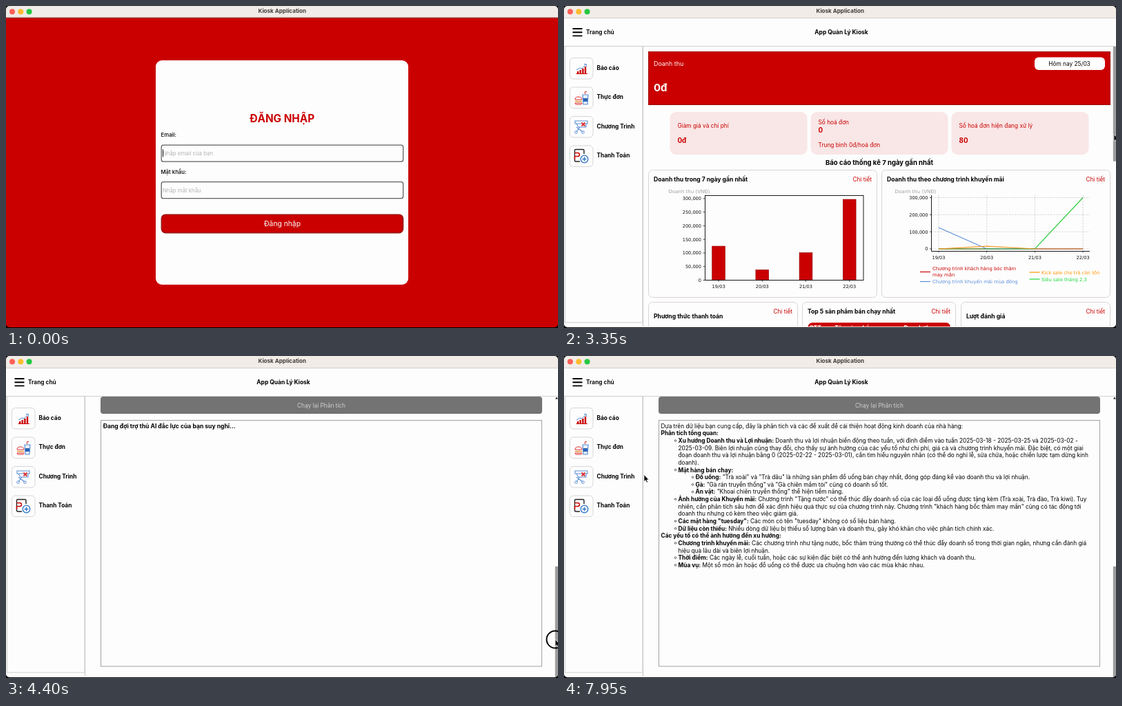
Animation of 800 by 468 pixels, one loop 8 s. Source, as an HTML page:

```html
<!DOCTYPE html>
<html lang="vi">
<head>
<meta charset="utf-8">
<style>
html, body { margin: 0; width: 100%; height: 100%; overflow: hidden; background: #000; }
svg { display: block; }
text { font: 8.3px Inter, sans-serif; white-space: pre; }
.b { font-weight: 700; }
.w { font-weight: 500; }
.d { font-family: "DejaVu Sans", sans-serif; }
.m { text-anchor: middle; }
.e { text-anchor: end; }
</style>
</head>
<body>
<svg id="stage" width="800" height="468" viewBox="0 0 800 468"></svg>
<script>
const RED = '#ca0000', DARK = '#9c0000', MID = '#d9252b', PINK = '#fca4a4', PALE = '#fde0e0';
const BLUE = '#5b8fd6', PAPER = '#fdfdfd', EDGE = '#d9d4d4';
const HEAD = 8.6;

const text = (x, y, s, cls = '', fill = '#000', size = 8.3) =>
  `<text x="${x}" y="${y}" class="${cls}" fill="${fill}" style="font-size:${size}px">${s}</text>`;
const rect = (x, y, w, h, fill, r = 0, stroke = 'none', sw = 1) =>
  `<rect x="${x}" y="${y}" width="${w}" height="${h}" rx="${r}" fill="${fill}" stroke="${stroke}" stroke-width="${sw}"/>`;
const path = (d, stroke, sw = 1, fill = 'none', more = '') =>
  `<path d="${d}" stroke="${stroke}" stroke-width="${sw}" fill="${fill}" ${more}/>`;
const circle = (x, y, r, fill, stroke = 'none', sw = 1) =>
  `<circle cx="${x}" cy="${y}" r="${r}" fill="${fill}" stroke="${stroke}" stroke-width="${sw}"/>`;
const group = (id, body, more = '') => `<g id="${id}" ${more}>${body}</g>`;
const each = (list, fn) => list.map(fn).join('');

// Angles in degrees, clockwise from the right
function wedge(cx, cy, r, from, to, fill) {
  const point = a => `${cx + r * Math.cos(a * Math.PI / 180)} ${cy + r * Math.sin(a * Math.PI / 180)}`;
  return path(`M${cx} ${cy}L${point(from)}A${r} ${r} 0 ${+(to - from > 180)} 1 ${point(to)}Z`, 'none', 0, fill);
}

function titleBar() {
  return rect(0, 0, 800, 17, '#f1ece8') +
    each(['#fe5f57', '#febc2e', '#28c840'], (c, i) => circle(9 + 12.3 * i, 8.2, 4, c)) +
    text(400.3, 10, 'Kiosk Application', 'b m', '#403d3b', 8.1);
}

function login() {
  return rect(0, 17, 800, 451, RED) + rect(0, 16.5, 800, 1.5, '#a03a36') +
    rect(217, 79, 366, 326, PAPER, 9) +
    text(400, 169, 'ĐĂNG NHẬP', 'b m', RED, 15.3) +
    text(224.5, 190, 'Email:', 'w', '#000', 7.8) +
    text(224.5, 244, 'Mật khẩu:', 'w', '#000', 7.8) +
    each([202.2, 255.7], y => rect(225.2, y, 350.4, 24, PAPER, 3, '#606060', 1.3)) +
    rect(225.2, 303, 350.4, 26.8, RED, 6, '#8a1010', 1.2) +
    text(400.5, 320.3, 'Đăng nhập', 'm', '#fff', 10.3) +
    group('email', text(227, 217, '', '', '#000', 7.8)) +
    group('pass', text(227, 270.8, '', '', '#000', 7.8)) +
    group('caret', rect(0, 0, .9, 11, '#000'));
}

function icons() {
  const chart = path('M17.5 98.5H34', RED) +
    each([3, 5, 7, 10], (h, i) => rect(19 + 3.6 * i, 98 - h, 2.4, h, RED)) +
    path('M18 93L23 90L26 91L32 84.5M29 84.5H32.3V88', BLUE);
  const meal = path('M16 136Q16 132 21 132T26 136Z M16 141H26Q26 143 24 143H18Q16 143 16 141Z', '#d33') +
    path('M16 138.5H26', '#e3983a', 1.5) +
    path('M27 129H35L34 143H28Z', BLUE, 1.2, '#e8f0fb') + rect(28, 134, 6, 5, '#2b66b5') +
    path('M30.5 128V124.5H33', '#d33');
  const promo = path('M16 167H34V171H16ZM18 171L21 176H32V171M23 176L18 183M18 176L27 183', BLUE, 1.1) +
    path('M25.5 169.5L30.5 174.5M30.5 169.5L25.5 174.5', '#d33', 1.8) +
    circle(17.5, 183.5, 1.8, 'none', BLUE) + circle(27.5, 183.5, 1.8, 'none', BLUE);
  const pay = path('M29 215V210Q29 208.5 27.5 208.5H17Q15.5 208.5 15.5 210V224Q15.5 226 17 226H23', '#222', 1.4) +
    path('M15.5 213.5H20Q22.5 213.5 22.5 216T20 218.5H15.5V223', RED, 1.4) +
    circle(29.5, 222.5, 5.3, '#fff', '#2b72c4', 1.3) + path('M26.5 222.5H32.5M29.5 219.5V225.5', '#2b72c4', 1.3);
  return chart + meal + promo + pay;
}

function shell() {
  return rect(0, 17, 800, 450, PAPER) +
    path('M0 17.5H800M0 58.5H800', '#d2d0d0') +
    path('M12.5 33H26.5M12.5 38.2H26.5M12.5 43.4H26.5', '#000', 1.9) +
    text(32, 41, 'Trang chủ', 'b', '#111', 8.3) +
    text(402, 41, 'App Quản Lý Kiosk', 'b m', '#000', 8.45) +
    rect(1.5, 58.5, 112.5, 401.5, 'none', 0, '#ccc') + path('M114.5 58V466', '#c4c4c4') +
    each(['Báo cáo', 'Thực đơn', 'Chương Trình', 'Thanh Toán'], (s, i) =>
      rect(8.5, 75.5 + 42.5 * i, 33.5, 30.5, PAPER, 5, '#d6d6d6') + text(47.5, 92.7 + 42.5 * i, s, 'b')) +
    icons();
}

function summary() {
  return rect(122.5, 66.5, 669, 77, RED, 0, '#9d0a0a') +
    text(130, 87, 'Doanh thu', '', '#fff', 8.9) + text(130, 124.3, '0đ', 'b', '#fff', 15) +
    rect(682, 74.5, 102, 18.5, '#fff', 6) + text(732.5, 87, 'Hôm nay 25/03', 'm') +
    each([153.5, 357.5, 561.5], x => rect(x, 154, 199, 62, '#f9e6e6', 9)) +
    text(164.5, 177, 'Giảm giá và chi phí', '', RED) + text(164.5, 199, '0đ', 'b', RED, 9.8) +
    text(368.5, 172, 'Số hoá đơn', '', RED) + text(368.5, 183.5, '0', 'b', RED, 9.8) +
    text(368.5, 205, 'Trung bình 0đ/hoá đơn', '', RED) +
    text(572.5, 177, 'Số hoá đơn hiện đang xử lý', '', RED) + text(572.5, 199, '80', 'b', RED, 9.8) +
    text(457, 230.5, 'Báo cáo thống kê 7 ngày gần nhất', 'b m', '#000', 9.55);
}

const card = (x, y, w, h, title, base, link) =>
  rect(x + .5, y + .5, w - 1, h - 1, PAPER, 6, EDGE) + text(x + 8, base, title, 'b', '#000', HEAD) +
  text(x + w - 8, link, 'Chi tiết', 'e', RED);
const tick = (x, y, s, cls) => text(x, y, s, 'd ' + cls, '#111', 6.6);
const money = k => k ? k + ',000' : '0';
const days = ['19/03', '20/03', '21/03', '22/03'];

function barChart() {
  const floor = 398.5;
  return card(122, 238, 332, 186, 'Doanh thu trong 7 ngày gần nhất', 255, 255) +
    text(151.5, 271.5, 'Doanh thu (VNĐ)', 'd', '#a0a0a0', 7) +
    each([125, 38, 101, 297], (v, i) => {
      const h = v * .3955, x = 214.7 + 63.2 * i;
      return rect(x, floor - h, 18.8, h, RED, 0, '#8d0000', .6) + path(`M${x + 9.4} 398V401`, '#000', .7) +
        tick(x + 9.4, 409.5, days[i], 'm');
    }) +
    each([0, 50, 100, 150, 200, 250, 300], v => {
      const y = floor - v * .3955;
      return path(`M201.5 ${y}H204`, '#000', .7) + tick(199, y + 2.4, money(v), 'e');
    }) +
    rect(204.5, 275.5, 229.5, 123, 'none', 0, '#000', .9);
}

function lineChart() {
  const px = i => 543 + 69.7 * i, py = v => 353 - v * .2483;
  const line = (values, color) => path('M' + values.map((v, i) => `${px(i)} ${py(v)}`).join('L'), color, 1.2);
  const grid = d => path(d, '#c9c9c9', .7, 'none', 'stroke-dasharray="2.6 1.4"');
  const key = (x, y, color) => path(`M${x} ${y}h15`, color, 1.2);
  const label = (x, y, s, color) => text(x, y, s, 'd', color, 6.85);
  return card(460, 238, 332, 186, 'Doanh thu theo chương trình khuyến mãi', 255, 255) +
    text(479.5, 271.5, 'Doanh thu (VNĐ)', 'd', '#a0a0a0', 7) +
    each([0, 100, 200, 300], v => grid(`M533 ${py(v)}H762`) +
      path(`M530 ${py(v)}h2.5`, '#000', .7) + tick(527.5, py(v) + 2.4, money(v), 'e')) +
    each(days, (s, i) => grid(`M${px(i)} 275V356`) +
      path(`M${px(i)} 356v2.5`, '#000', .7) + tick(px(i), 368, s, 'm')) +
    path('M532.5 275V356.5H762', '#000', .9) +
    line([0, 0, 0, 0], RED) + line([125, 0, 0, 0], BLUE) +
    line([0, 0, 0, 300], '#2ecc40') + line([0, 16, 0, 0], '#f59a23') +
    key(516, 386.5, RED) + label(534, 384, 'Chương trình khách hàng bóc thăm', RED) + label(534, 393, 'may mắn', RED) +
    key(516, 400.5, BLUE) + label(534, 403, 'Chương trình khuyến mãi mùa đông', BLUE) +
    key(674.5, 387, '#ff9500') + label(692, 389.5, 'Kick sale cho trà còn tồn', '#ff9500') +
    key(674.5, 397, '#1fd83c') + label(692, 399.5, 'Siêu sale tháng 2,3', '#1fd83c');
}

function breakdown() {
  const swatch = (x, c, w = 18) => rect(x, 610, w, 5.5, c);
  const label = (x, y, s, fill = '#000', cls = '') => text(x, y, s, 'd ' + cls, fill, 8.6);
  const head = (x, s) => text(x, 471, s, 'b m', '#fff', HEAD);
  const rows = [['Mì ý sốt cà', 110], ['Khoai chiên đặc biệt', 90], ['Trà vải', 64], ['Trà xoài', 22], ['Trà đào', 19]];
  return card(122, 430, 217, 202, 'Phương thức thanh toán', 453.5, 446.7) +
    wedge(233, 546, 48, 72, 360, DARK) + wedge(233, 546, 48, 0, 72, MID) +
    label(210, 532, '80.0%', '#fff', 'm') + label(257, 565.5, '20.0%', '#fff', 'm') +
    rect(176.5, 604.5, 114, 16.5, PAPER, 1.5, '#ccc') +
    swatch(179, DARK) + label(203.5, 615.5, 'cash') + swatch(240.7, MID) + label(265, 615.5, 'bank') +
    card(345, 430, 223, 202, 'Top 5 sản phẩm bán chạy nhất', 446.7, 446.7) +
    path('M353.5 475V467.5Q353.5 460.3 361 460.3H553Q560 460.3 560 467.5V475Z', 'none', 0, RED) +
    head(364.5, 'STT') + head(421.5, 'Tên sản phẩm') + head(514, 'Doanh thu') +
    each(rows, ([name, sum], i) => {
      const y = 488 + 18.75 * i;
      return text(364.3, y, i + 1, 'm') + text(378.5, y, name) + text(556, y, money(sum), 'e');
    }) +
    card(575, 430, 217, 202, 'Lượt đánh giá', 453.5, 446.7) +
    each([[100, 360, DARK], [63, 100, RED], [40, 63, MID], [8, 40, PINK], [0, 8, PALE]],
      ([a, b, c]) => wedge(685.5, 546, 48, a, b, c)) +
    path('M583 604.5H784M583 621H784', '#ccc') + swatch(583, DARK, 11) +
    each([RED, MID, PINK, PALE], (c, i) => swatch(623.3 + 47.3 * i, c)) +
    each([5, 4, 3, 2], (n, i) => label(600.7 + 47.2 * i, 615.5, n));
}

// Leading digit is the list depth, "-" starts an item, asterisks mark bold
const report = `0 Dựa trên dữ liệu bạn cung cấp, đây là phân tích và các đề xuất để cải thiện hoạt động kinh doanh của nhà hàng:
0 *Phân tích tổng quan:*
1-*Xu hướng Doanh thu và Lợi nhuận:* Doanh thu và lợi nhuận biến động theo tuần, với đỉnh điểm vào tuần 2025-03-18 - 2025-03-25 và 2025-03-02 -
1 2025-03-09. Biên lợi nhuận cũng thay đổi, cho thấy sự ảnh hưởng của các yếu tố như chi phí, giá cả và chương trình khuyến mãi. Đặc biệt, có một giai
1 đoạn doanh thu và lợi nhuận bằng 0 (2025-02-22 - 2025-03-01), cần tìm hiểu nguyên nhân (có thể do nghỉ lễ, sửa chữa, hoặc chiến lược tạm dừng kinh
1 doanh).
1-*Mặt hàng bán chạy:*
2-*Đồ uống:* "Trà xoài" và "Trà dâu" là những sản phẩm đồ uống bán chạy nhất, đóng góp đáng kể vào doanh thu và lợi nhuận.
2-*Gà:* "Gà rán truyền thống" và "Gà chiên mắm tỏi" cũng có doanh số tốt.
2-*Ăn vặt:* "Khoai chiên truyền thống" thể hiện tiềm năng.
1-*Ảnh hưởng của Khuyến mãi:* Chương trình "Tặng nước" có thể thúc đẩy doanh số của các loại đồ uống được tặng kèm (Trà xoài, Trà đào, Trà kiwi). Tuy
1 nhiên, cần phân tích sâu hơn để xác định hiệu quả thực sự của chương trình này. Chương trình "khách hàng bốc thăm may mắn" cũng có tác động tới
1 doanh thu nhưng có kèm theo việc giảm giá.
1-*Các mặt hàng "tuesday":* Các món có tên "tuesday" không có số liệu bán hàng.
1-*Dữ liệu còn thiếu:* Nhiều dòng dữ liệu bị thiếu số lượng bán và doanh thu, gây khó khăn cho việc phân tích chính xác.
0 *Các yếu tố có thể ảnh hưởng đến xu hướng:*
1-*Chương trình khuyến mãi:* Các chương trình như tặng nước, bốc thăm trúng thưởng có thể thúc đẩy doanh số trong thời gian ngắn, nhưng cần đánh giá
1 hiệu quả lâu dài và biên lợi nhuận.
1-*Thời điểm:* Các ngày lễ, cuối tuần, hoặc các sự kiện đặc biệt có thể ảnh hưởng đến lượng khách và doanh thu.
1-*Mùa vụ:* Một số món ăn hoặc đồ uống có thể được ưa chuộng hơn vào các mùa khác nhau.`.split('\n');

function advice() {
  return text(129.5, 654.7, 'Lời khuyên từ AI', 'b', '#000', HEAD) +
    rect(137, 669, 640, 25, '#737373', 4) + text(457, 684.5, 'Chạy lại Phân tích', 'm', '#cfcfcf') +
    rect(137.5, 703.5, 639, 357.5, PAPER, 0, '#a2a2a2') +
    group('waiting', text(140.5, 714.7, 'Đang đợi trợ thủ AI đắc lực của bạn suy nghĩ...', 'b', '#000', HEAD)) +
    group('report', each(report, (s, i) => {
      const x = 140.5 + 25 * s[0], y = 714.7 + 10.64 * i;
      return (s[1] === '-' ? circle(x - 4, y - 3, 1.3, 'none', '#222', .7) : '') +
        text(x, y, s.slice(2).replace(/\*(.+?)\*/, '<tspan class="b">$1</tspan>'));
    }));
}

const $ = id => document.getElementById(id);
$('stage').innerHTML =
  `<defs><clipPath id="window">${rect(0, 0, 800, 467, '#000', 5)}</clipPath>
   <clipPath id="view">${rect(115, 59, 685, 407, '#000')}</clipPath></defs>` +
  group('app', titleBar() + group('login', login()) +
    group('home', shell() +
      group('pane', group('content', summary() + barChart() + lineChart() + breakdown() + advice()) +
        path('M796 62.5L798 59.5L800 62.5Z', 'none', 0, '#222') +
        group('thumb', rect(795.8, 0, 4.2, 167, '#9c9c9c', 1)), 'clip-path="url(#view)"')),
    'clip-path="url(#window)"') +
  group('pointer', group('ring', circle(0, 0, 12.5, 'none', '#000', 1.9)) +
    path('M0 0V10L2.3 7.9L3.9 11.5L5.5 10.8L4 7.4H7Z', '#fff', .7, '#000'));

const pointerKeys = [[900, 340, 222], [1050, 299, 265], [1500, 299, 265], [1700, 338, 319.5], [2600, 338, 319.5],
  [3250, 797, 186], [3450, 797, 187], [3550, 798, 240], [3850, 796, 371.5], [3980, 796, 412], [4600, 796, 412],
  [5100, 790, 371.5], [5350, 790, 371.5], [5850, 773.5, 353], [6600, 773.5, 353], [6750, 773.5, 350.5],
  [7250, 773.5, 350.5], [7900, 116, 172.5]];
const scrollKeys = [[3450, 0], [3550, 132], [3850, 489], [3980, 610]];
const smooth = u => u * u * (3 - 2 * u);

function tween(keys, t, ease = u => u) {
  const n = keys.findIndex(k => k[0] > t);
  if (n < 1) return (n ? keys[keys.length - 1] : keys[0]).slice(1);
  const a = keys[n - 1], b = keys[n], u = ease((t - a[0]) / (b[0] - a[0]));
  return a.slice(1).map((v, i) => v + (b[i + 1] - v) * u);
}

const show = (id, on) => $(id).setAttribute('display', on ? 'inline' : 'none');
const move = (id, x, y) => $(id).setAttribute('transform', `translate(${x} ${y})`);
const typed = (s, t, start, step) => s.slice(0, Math.max(0, Math.floor((t - start) / step)));

function fill(id, value, hint) {
  const el = $(id).firstChild;
  el.textContent = value || hint;
  el.setAttribute('fill', value ? '#000' : '#b4b4b4');
  return value ? el.getComputedTextLength() : 0;
}

function draw(t) {
  const inside = t >= 1850;
  show('login', !inside);
  show('home', inside);
  if (!inside) {
    const first = fill('email', typed('thunghiem8@vidu.test', t, 10, 40), 'Nhập email của bạn');
    const second = fill('pass', typed('••••••••••', t, 1150, 35), 'Nhập mật khẩu');
    const onEmail = t < 1050;
    move('caret', 227 + (onEmail ? first : second), onEmail ? 208.3 : 262);
  }
  const [scroll] = tween(scrollKeys, t);
  move('content', 0, -scroll);
  move('thumb', 0, 58.7 + .405 * scroll);
  show('waiting', t < 6600);
  show('report', t >= 6600);
  const dragging = t >= 3450 && t < 3980;
  move('pointer', ...tween(pointerKeys, t, dragging ? undefined : smooth));
  show('pointer', t >= 900 && (t < 1150 || t >= 1500));
  show('ring', t >= 3400 && t < 4600);
}

const TICK = 50;

function loop() {
  const t = performance.now() % 8000;
  draw(t - t % TICK);
  requestAnimationFrame(loop);
}
loop();
</script>
</body>
</html>
```
